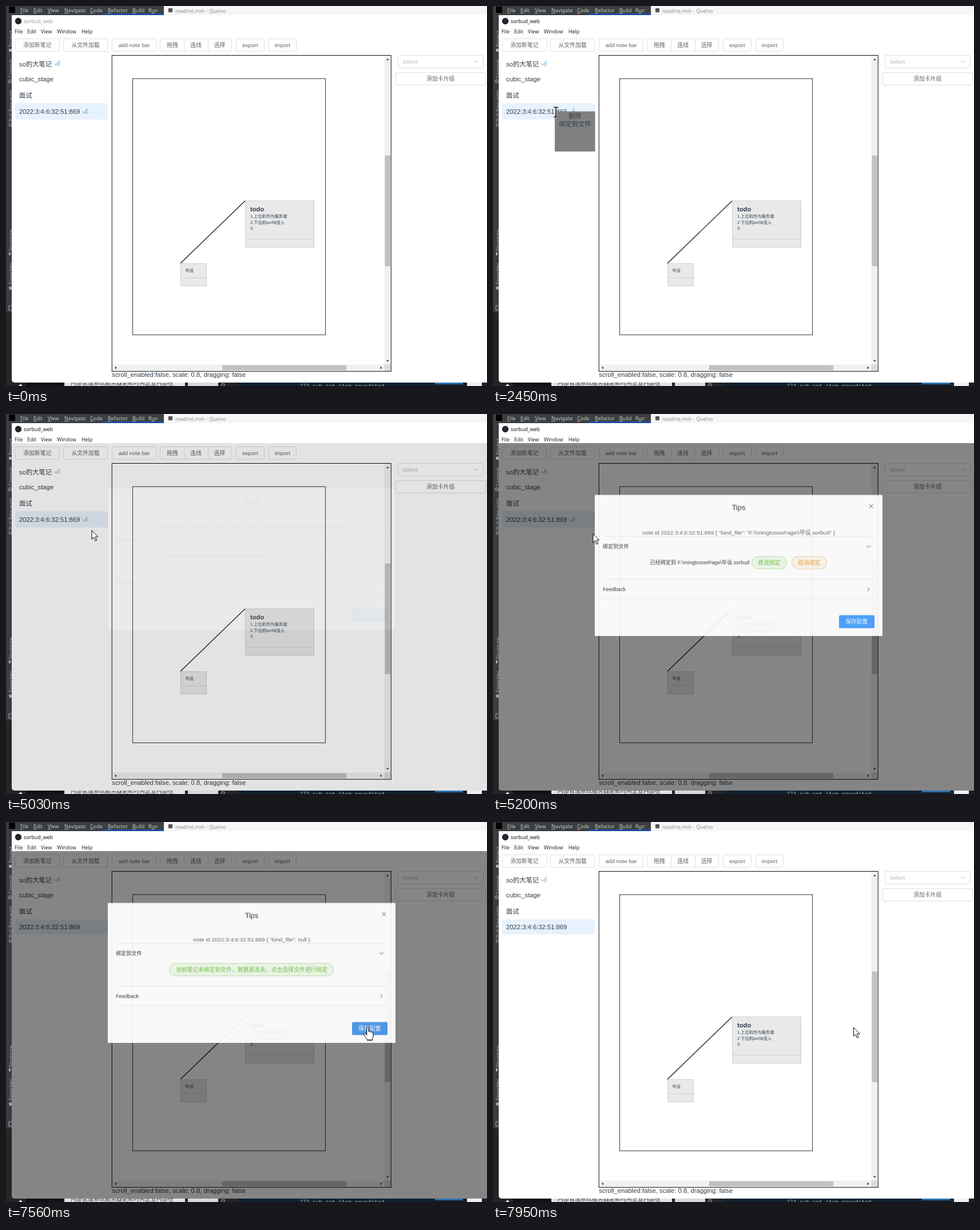
An HTML page for the animation above (8000 ms loop, 841 px wide and 666 px high).

```html
<!DOCTYPE html>
<html lang="zh-CN">
<head>
<meta charset="utf-8">
<title>Note binding</title>
<style>
html, body { margin: 0; width: 841px; height: 666px; overflow: hidden; background: #2b2b2b; }
svg { display: block; font-family: "Liberation Sans", Arial, "Noto Sans CJK SC", "Noto Sans CJK", sans-serif; }
.sys { font: 8.9px "Noto Sans", "Open Sans", sans-serif; }
.list { font-size: 11.25px; fill: #2f3d4b; }
.ui { font-size: 9.84px; fill: #606266; }
.body { font-size: 9.14px; fill: #303133; }
.note { font-size: 7.3px; fill: #2f3d4b; }
.mid { text-anchor: middle; }
.line { fill: none; stroke: #111; }
.btn { fill: #fff; stroke: #dcdfe6; }
.rule { stroke: #ebeef5; }
.chev { fill: none; stroke: #50545a; }

.step { animation: 8s step-end infinite; }
.title { animation-name: title; }
.tick { fill: none; stroke: #4fa3d8; animation-name: tick; }
.menu { animation-name: menu; }
.bound { animation-name: bound; }
.free { animation-name: free; }
.hot { animation-name: hot; }
.row { animation-name: row; }
.sheet { animation-name: sheet; }
.arrow { animation-name: arrow; }
.beam { animation-name: beam; }
.hand { animation-name: hand; }
.save { fill: #409eff; animation-name: save; }
.slide { animation-name: slide; }
.veil { animation: veil 8s linear infinite; }
.dialog { animation: dialog 8s linear infinite; }
.cursor { animation: move 8s ease-in-out infinite; }

@keyframes title { 0% { fill: #999 } 28.625%, to { fill: #111 } }
@keyframes tick { 0% { stroke: #4fa3d8 } 62.2%, to { stroke: #8d969b } }
@keyframes menu { 0% { visibility: hidden } 28.625% { visibility: visible } 60.75%, to { visibility: hidden } }
@keyframes bound { 0% { visibility: visible } 81.75%, to { visibility: hidden } }
@keyframes free { 0% { visibility: hidden } 81.75%, to { visibility: visible } }
@keyframes hot { 0% { visibility: hidden } 73.1% { visibility: visible } 81.75%, to { visibility: hidden } }
@keyframes row { 0% { visibility: visible } 94.25%, to { visibility: hidden } }
@keyframes slide { 0% { transform: none } 94.25%, to { transform: translateY(-1px) } }
@keyframes sheet { 0% { transform: none } 81.75%, to { transform: translateY(-2px) } }
@keyframes save { 0% { fill: #409eff } 89.5% { fill: #66b1ff } 93%, to { fill: #4595e8 } }
@keyframes veil {
  0% { opacity: 0 }
  62.27% { opacity: 0; animation-timing-function: ease }
  66.02% { opacity: 1 }
  94.29% { opacity: 1; animation-timing-function: ease }
  98.04%, to { opacity: 0 }
}
@keyframes dialog {
  0% { opacity: 0; transform: translateY(-15px) }
  62.27% { opacity: 0; transform: translateY(-15px); animation-timing-function: ease }
  66.02% { opacity: 1; transform: none }
  94.29% { opacity: 1; transform: none; animation-timing-function: ease }
  98.04%, to { opacity: 0; transform: translateY(-15px) }
}
@keyframes arrow {
  0% { visibility: hidden } 6.625% { visibility: visible } 24% { visibility: hidden }
  45.5% { visibility: visible } 51% { visibility: hidden } 60.75% { visibility: visible }
  73.1% { visibility: hidden } 84% { visibility: visible } 89.5% { visibility: hidden }
  95.2%, to { visibility: visible }
}
@keyframes beam {
  0% { visibility: hidden } 24% { visibility: visible } 45.5% { visibility: hidden }
  51% { visibility: visible } 60.75%, to { visibility: hidden }
}
@keyframes hand {
  0% { visibility: hidden } 73.1% { visibility: visible } 84% { visibility: hidden }
  89.5% { visibility: visible } 95.2%, to { visibility: hidden }
}
@keyframes move {
  0%, 6% { transform: translate(703px, 664px) }
  15.9% { transform: translate(160px, 241px) }
  17% { transform: translate(158px, 239px) }
  25.9%, 31.2% { transform: translate(110px, 185px) }
  39.6% { transform: translate(144px, 210px) }
  41% { transform: translate(146px, 211px) }
  47.6%, 50% { transform: translate(176.500px, 208.500px) }
  58%, 63.8% { transform: translate(149.500px, 203.500px) }
  70% { transform: translate(470px, 278px) }
  76.5%, 82% { transform: translate(555px, 266px) }
  90.6%, to { transform: translate(630px, 359.500px) }
}
</style>
</head>
<body>
<svg width="841" height="666" viewBox="0 0 841 666">
  <defs>
    <path id="tick" d="M0 5l3 3L10 0M6 4.500h4.500M5 8h5.500"/>
    <path id="down" d="M-3.500-1.800L0 1.700 3.500-1.800"/>
    <path id="tri" d="M-2.500 1.500L0-1.500 2.500 1.500z"/>
  </defs>

  <!-- Editor behind the window -->
  <rect width="841" height="666" fill="#242526"/>
  <rect width="14" height="537" fill="#3a3d3f"/>
  <rect width="276" height="16" fill="#3c3f41"/>
  <rect x="167" y="13" width="109" height="3" fill="#1d4f9c"/>
  <rect x="276" width="565" height="16" fill="#f6f6f6"/>
  <rect x="5" y="1" width="11" height="11"/>
  <rect x="284" y="4" width="7" height="7" fill="#555"/>
  <g class="sys" fill="#c4c6c8">
    <text x="25" y="11"><tspan text-decoration="underline">F</tspan>ile</text>
    <text x="48" y="11"><tspan text-decoration="underline">E</tspan>dit</text>
    <text x="73" y="11"><tspan text-decoration="underline">V</tspan>iew</text>
    <text x="102" y="11"><tspan text-decoration="underline">N</tspan>avigate</text>
    <text x="147" y="11"><tspan text-decoration="underline">C</tspan>ode</text>
    <text x="178" y="11"><tspan text-decoration="underline">R</tspan>efactor</text>
    <text x="221" y="11"><tspan text-decoration="underline">B</tspan>uild</text>
    <text x="249" y="11">R<tspan text-decoration="underline">u</tspan>n</text>
  </g>
  <text class="sys" x="296" y="11.500" fill="#909090">readme.md• - Quelvo</text>
  <g class="sys" fill="#a9abad">
    <text transform="translate(12 72) rotate(-90)">Project</text>
    <text transform="translate(12 126) rotate(-90)">Commit</text>
    <text transform="translate(12 203) rotate(-90)">Pull Requests</text>
    <text transform="translate(12 430) rotate(-90)">Structure</text>
    <text transform="translate(12 488) rotate(-90)">Favorites</text>
    <path d="M5 75h5v5H5zM5 432h3v5H5zM8 490l1.200 2.500 2.800.3-2 2 .5 3-2.500-1.500L5.500 498l.5-3-2-2 2.800-.5z"/>
    <path d="M4 132h6M7 129a3 3 0 1 0 .1 0M6 205v7M9 205v7M5 525h6v8H5z" fill="none" stroke="#a9abad"/>
  </g>
  <g>
    <rect x="35" y="660" width="67" height="6" fill="#111"/>
    <path d="M22 666l3.500-4 3.500 4z" fill="#ddd"/>
    <rect x="102" y="660" width="211" height="6" fill="#e2e2e2"/>
    <text x="113" y="664" font-size="10" fill="#333">内部管理系统服务器更新时间企业内部在</text>
    <rect x="318" y="660" width="53" height="6" fill="#d8d8d8"/>
    <rect x="405" y="660" width="436" height="6" fill="#10212f"/>
    <path d="M377 662h5v4h-5z" fill="none" stroke="#aaa"/>
    <text x="513" y="669" font-size="9.500" fill="#a8b4bd" style="font-family:'Noto Sans Mono',monospace">223 sub-set-item.newedited</text>
    <rect x="750" y="660" width="49" height="3" fill="#2c71ad"/>
    <rect x="806" y="660" width="26" height="6" fill="#eee"/>
  </g>

  <!-- Window -->
  <path id="window" d="M10 16H841V660H15a5 5 0 0 1-5-5z" fill="#fff"/>
  <circle cx="21.500" cy="26.500" r="5.700" fill="#24262e"/>
  <text class="sys step title" x="31" y="29.800">sorbud_web</text>
  <g class="sys" fill="#1c2a3c">
    <text x="15" y="48">File</text><text x="37" y="48">Edit</text><text x="61" y="48">View</text>
    <text x="89" y="48">Window</text><text x="132" y="48">Help</text>
  </g>
  <g class="btn">
    <rect x="16.500" y="57.500" width="77" height="22" rx="2.500"/>
    <rect x="100.500" y="57.500" width="77" height="22" rx="2.500"/>
    <rect x="185.500" y="57.500" width="77" height="22" rx="2.500"/>
    <rect x="269.500" y="57.500" width="125" height="22" rx="2.500"/>
    <path d="M311.500 57.500v22M353.500 57.500v22"/>
    <rect x="402.500" y="57.500" width="49" height="22" rx="2.500"/>
    <rect x="459.500" y="57.500" width="48" height="22" rx="2.500"/>
    <rect x="685.500" y="86.500" width="149" height="22" rx="2.500"/>
    <rect x="681.500" y="116.500" width="157" height="22" rx="2.500"/>
  </g>
  <g class="ui mid">
    <text x="54.800" y="72">添加新笔记</text><text x="139" y="72">从文件加载</text>
    <text x="224" y="72">add note bar</text>
    <text x="290.800" y="72">拖拽</text><text x="332" y="72">连线</text><text x="373.500" y="72">选择</text>
    <text x="426.800" y="72">export</text><text x="483.300" y="72">import</text>
    <text x="759.800" y="131">添加卡片组</text>
  </g>
  <text x="693" y="101" font-size="9.840" fill="#b4b7bd">Select</text>
  <use href="#down" x="822" y="97.500" fill="none" stroke="#b4b7bd"/>

  <!-- Note list -->
  <g class="list">
    <rect class="step row" x="16" y="170.500" width="162" height="28.500" rx="3" fill="#e8f2fc"/>
    <rect x="16" y="170.500" width="162" height="26.700" rx="3" fill="#e8f2fc"/>
    <text x="23" y="105.500">so的大笔记</text>
    <text x="23" y="132">cubic_stage</text>
    <text x="23" y="161">面试</text>
    <text class="step slide" x="23" y="188.700">2022:3:4:6:32:51:869</text>
    <use class="step tick" href="#tick" x="84" y="95.500"/>
    <g class="step row"><use class="step tick" href="#tick" x="133" y="179.500"/></g>
    <text x="185.300" y="650">scroll_enabled:false, scale: 0.8, dragging: false</text>
  </g>

  <!-- Board -->
  <path d="M661.500 87H673V628.500H661.500zM186 628.500H661.500V640H186z" fill="#f1f1f1"/>
  <rect x="661.500" y="628.500" width="11.500" height="11.500" fill="#dcdcdc"/>
  <path d="M662.500 262h9.500v194h-9.500zM378 629.500h217v9H378z" fill="#c1c1c1"/>
  <g fill="#404040">
    <use href="#tri" x="667.300" y="93.500"/>
    <use href="#tri" transform="translate(667.300 622) rotate(180)"/>
    <use href="#tri" transform="translate(191.500 634) rotate(-90)"/>
    <use href="#tri" transform="translate(656 634) rotate(90)"/>
  </g>
  <rect class="line" x="185.250" y="86.500" width="488" height="553.800"/>
  <rect class="line" x="221.500" y="127.300" width="337" height="449" stroke-opacity=".85"/>
  <path class="line" d="M305 451L418 341.500" stroke-width="1.150"/>
  <g fill="#e9e9e9" stroke="#cfcfcf">
    <path d="M418.500 341.500h120v81.500h-120zM418.500 409h120"/>
    <path d="M305.500 451.500h45v39h-45zM305.500 476.500h45"/>
  </g>
  <text x="427" y="359.500" font-size="11.200" font-weight="bold" fill="#2f3d4b">todo</text>
  <g class="note">
    <text x="427" y="371">1.上位机作为服务端</text>
    <text x="427" y="381.500">2.下位机kvr58连入</text>
    <text x="427" y="391.500">3.</text>
    <text x="313.500" y="466">毕设</text>
  </g>

  <!-- Context menu -->
  <g class="step menu">
    <rect x="108" y="184.700" width="70.500" height="70.300" fill="#808080"/>
    <g class="list mid">
      <text x="143.300" y="196.500">删除</text><text x="143.300" y="211.300">绑定到文件</text>
    </g>
  </g>

  <!-- Dialog -->
  <g class="veil">
    <path d="M10 51H841V660H15a5 5 0 0 1-5-5z" fill-opacity=".5"/>
    <g class="dialog">
      <rect x="178" y="142.500" width="503" height="245.500" rx="1.500" fill="#fff"/>
      <text class="mid" x="429.500" y="169" font-size="12.660" fill="#303133">Tips</text>
      <path class="chev" d="M657.800 159l6.500 6.500m0-6.500l-6.500 6.500"/>
      <g class="step sheet">
        <rect x="178" y="380" width="503" height="10" rx="1.500" fill="#fff"/>
        <path class="rule" d="M192 215.500h475M192 290.500h475M192 324.500h475"/>
        <g class="body">
          <text x="192" y="235.500">绑定到文件</text><text x="192" y="310.500">Feedback</text>
        </g>
        <use class="chev" href="#down" x="656.500" y="233"/>
        <use class="chev" href="#down" transform="translate(656.500 308) rotate(-90)"/>
        <rect class="step save" x="605" y="353.300" width="62" height="22.700" rx="2.500"/>
        <text class="mid" x="635.800" y="368.300" font-size="9.840" fill="#fff">保存配置</text>
        <g class="step bound">
          <text class="ui mid" x="429.500" y="212.300">note id 2022:3:4:6:32:51:869 { "bind_file": "F:\\mingtuoooPage\\毕设.sorbud" }</text>
          <text class="body" x="274.500" y="263.800">已经绑定到 F:\mingtuoooPage\毕设.sorbud</text>
          <rect x="452.500" y="250.500" width="61" height="21.500" rx="10.750" fill="#f0f9eb" stroke="#b3e19d"/>
          <text class="mid" x="483" y="265" font-size="9.840" fill="#67c23a">修改绑定</text>
          <rect x="522.500" y="250.500" width="61" height="21.500" rx="10.750" fill="#fdf6ec" stroke="#f3d19e"/>
          <text class="mid" x="553" y="265" font-size="9.840" fill="#e6a23c">取消绑定</text>
        </g>
        <g class="step hot">
          <rect x="522" y="250" width="62" height="22.500" rx="11.250" fill="#e6a23c"/>
          <text class="mid" x="553" y="265" font-size="9.840" fill="#fff">取消绑定</text>
        </g>
        <g class="step free">
          <text class="ui mid" x="429.500" y="212.300">note id 2022:3:4:6:32:51:869 { "bind_file": null }</text>
          <rect x="285.500" y="250.500" width="287.500" height="21.500" rx="10.750" fill="#f0f9eb" stroke="#b3e19d"/>
          <text class="mid" x="429.300" y="265" font-size="9.840" fill="#67c23a">当前笔记未绑定到文件，数据易丢失，点击选择文件进行绑定</text>
        </g>
      </g>
    </g>
  </g>

  <g class="cursor" stroke="#000" fill="#fff" stroke-linejoin="round">
    <path class="step arrow" d="M.5.500V16l3.500-3.300 2.700 6.300 2.500-1.100-2.700-6.100H11.300z"/>
    <g class="step beam" fill="none">
      <path d="M-4-7.500h3l1 1 1-1h3M0-6.500V8.500M-4 9.500h3l1-1 1 1h3" stroke="#fff" stroke-width="3"/>
      <path d="M-4-7.500h3l1 1 1-1h3M0-6.500V8.500M-4 9.500h3l1-1 1 1h3" stroke-width="1.500"/>
    </g>
    <path class="step hand" d="M.8 1.200C.8-1.500 4-1.500 4 1.200V8c.8-1.300 3-.8 3 .6.900-1 2.700-.5 2.700 1 1-.8 2.300 0 2.300 1.300V16c0 2-1.500 3.500-1.700 6.500H1.500C1 19.500-3.500 16-4.300 13.500c-.5-1.800 1.500-2.800 2.800-1.500L.8 14z"/>
  </g>
</svg>
</body>
</html>
```
